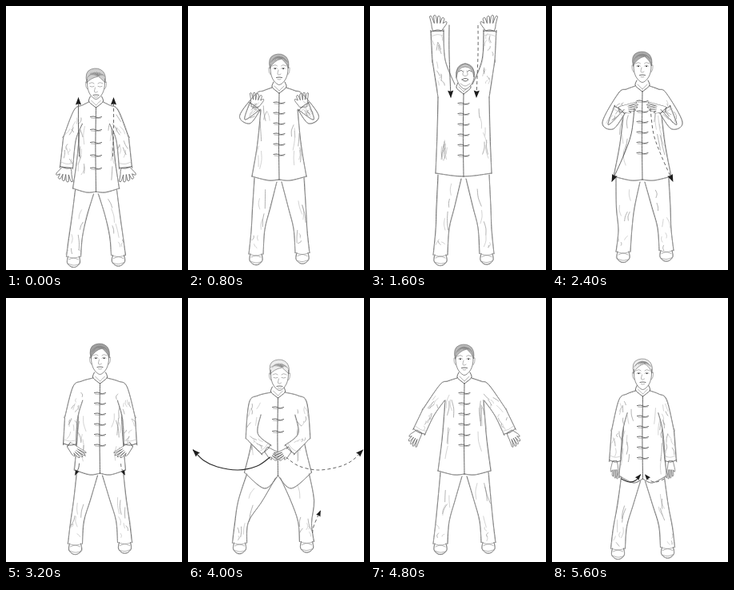
Recreate the animation shown at these times as an HTML page. Size 220 px wide and 330 px high, loop 6.8 s.

```html
<!DOCTYPE html>
<html lang="en">
<head>
<meta charset="utf-8">
<title>Standing exercise</title>
<style>
html, body { margin: 0; width: 100%; height: 100%; overflow: hidden; background: #fff; }
svg { display: block; width: 100vw; height: 100vh; }
path { fill: none; stroke: #555; stroke-width: .9; stroke-linecap: round; stroke-linejoin: round; }
.soft { stroke: #888; stroke-width: .65; }
.faint { stroke: #b4b4b4; stroke-width: .6; }
.dark { stroke: #2a2a2a; stroke-width: 1.15; }
.dash { stroke: #555; stroke-dasharray: 4 3; stroke-linecap: butt; }
.tip { fill: #1c1c1c; stroke: none; }
.skin { fill: #fff; stroke: #666; stroke-width: .75; }
.cover { fill: #fff; stroke: none; }
.hair { fill: #888; stroke: #666; stroke-width: .6; }
</style>
</head>
<body>
<svg id="stage" viewBox="0 0 220 330"></svg>
<script>
const NS = 'http://www.w3.org/2000/svg';
const stage = document.getElementById('stage');
let pen, seed;

function node(name, attrs, parent) {
  const el = document.createElementNS(NS, name);
  for (const k in attrs) el.setAttribute(k, attrs[k]);
  return parent.appendChild(el);
}
const shape = (d, cls = '') => node('path', { d, class: cls }, pen);

function within(transform, draw) {
  const outer = pen;
  pen = node('g', { transform }, outer);
  draw();
  pen = outer;
}

function rand() {
  seed = (seed * 16807) % 2147483647;
  return seed / 2147483647;
}
const jitter = r => (rand() - .5) * 2 * r;
const mix = (a, b, t) => [a[0] + (b[0] - a[0]) * t, a[1] + (b[1] - a[1]) * t];
const shift = (p, n, w) => [p[0] + n[0] * w, p[1] + n[1] * w];

// Smooth curve through a few points
function curve(p) {
  let d = 'M' + p[0];
  for (let i = 0; i < p.length - 1; i++) {
    const a = p[i - 1] || p[i], b = p[i], c = p[i + 1], e = p[i + 2] || c;
    d += 'C' + [shift(b, [c[0] - a[0], c[1] - a[1]], 1 / 6), shift(c, [e[0] - b[0], e[1] - b[1]], -1 / 6), c].join(' ');
  }
  return d;
}
const line = (p, cls) => shape(curve(p), cls);

// A firm stroke with a looser one beside it
function pencil(p) {
  line(p);
  line(p.map(q => [q[0] + jitter(.7), q[1] + jitter(.7)]), 'faint');
}

// Creases scattered along a limb from a to b
function folds(a, b, spread, n) {
  for (let i = 0; i < n; i++) {
    const t = rand() * .75, s = jitter(spread);
    const p = shift(mix(a, b, t), [1, 0], s);
    const q = shift(mix(a, b, t + .1 + rand() * .18), [1, 0], s + jitter(4));
    line([p, shift(mix(p, q, .5), [1, 0], jitter(1.5)), q], i % 2 ? 'soft' : 'faint');
  }
}

function arrow(p, cls) {
  const path = line(p, cls);
  const [a, b] = p.slice(-2);
  const turn = Math.atan2(b[1] - a[1], b[0] - a[0]) * 180 / Math.PI;
  const size = Math.min(1.05, .65 + path.getTotalLength() / 150);
  within(`translate(${b}) rotate(${turn}) scale(${size})`, () => shape('M1 0L-8-3.4L-7 0L-8 3.4Z', 'tip'));
}

// Open hand, fingers along +y
function hand(at, [turn, sx, sy]) {
  within(`translate(${at}) rotate(${turn}) scale(${sx} ${sy})`, () => {
    let d = 'M-4.5-1Q-6 3-6 7';
    for (let i = 0; i < 4; i++) {
      const x = -6 + i * 3, end = 15 + Math.sin(i + .6) * 2, splay = (i - 1.5) * 1.3;
      d += `L${x + splay} ${end}Q${x + splay + 1.5} ${end + 2} ${x + splay + 2.5} ${end - 1}L${x + 3} 8`;
    }
    shape(d + 'L9 10Q11 10 9 6L4.5-1Z', 'skin');
  });
}

function shoe(x, y, w = 16, h = 13) {
  const l = x - w / 2, r = x + w / 2;
  pencil([[l + 1, y], [l, y + h * .6], [x - 3, y + h], [x + 3, y + h], [r, y + h * .6], [r - 1, y]]);
  line([[l + 2, y + 4], [x, y + 2], [r - 2, y + 4]], 'soft');
  line([[l + 1, y + h * .75], [x, y + h * .85], [r - 1, y + h * .7]], 'soft');
}

function head(p) {
  const eye = p.down ? 22 : 18, brow = p.down ? 13 : 9;
  within(`translate(${p.cx + (p.lean || 0)} ${p.top})`, () => {
    for (const s of [-1, 1]) within(`scale(${s} 1)`, () => {
      line([[11, 18], [13, 17], [12.5, 23], [10.5, 26]], 'soft');
    });
    line([[-11, 13], [-10.5, 24], [-7, 33], [0, 38.5], [7, 33], [10.5, 24], [11, 13]], 'skin');
    const cap = shape(`M-11.5 18Q-15 4-6 1Q3-2 9 4Q13 9 11.5 18Q10 ${brow + 3} 3 ${brow - 3}Q-7 ${brow - 1}-11.5 18Z`, 'hair');
    cap.setAttribute('fill-opacity', p.shade || .15);
    for (let i = 0; i < 12; i++) {
      const x = -11 + i * 2, rim = 1 + x * x * .045;
      line([[3 + jitter(2), brow - 4], [x * .6, (rim + brow) / 2 - 2], [x, rim + 3 + rand() * 3]], 'soft');
    }
    for (const s of [-1, 1]) within(`scale(${s} 1)`, () => {
      line([[2.5, eye - 3], [5, eye - 4.3], [8.5, eye - 3]], 'soft');
      line([[2.5, eye + .3], [5, eye + (p.down ? 1 : -1)], [7.5, eye + .3]], 'soft');
      if (!p.down) line([[4.6, eye + .3], [5.6, eye + .3]], 'dark');
    });
    line([[-1, eye + 2], [-2, eye + 7], [0, eye + 8], [2, eye + 7]], 'soft');
    line([[-3.5, eye + 11.5], [0, eye + 11], [3.5, eye + 11.5]]);
    line([[-2, eye + 13.5], [0, eye + 14], [2, eye + 13.5]], 'soft');
  });
}

function faceUp(p) {
  within(`translate(${p.cx + 2} ${p.top})`, () => {
    line([[-11, 18], [-10, 8], [0, 0], [10, 8], [11, 18], [7, 27], [0, 32], [-7, 27], [-11, 18]], 'skin');
    shape('M-11 17Q-13 1 0 0Q13 1 11 17Q9 4 0 4Q-9 4-11 17Z', 'hair').setAttribute('fill-opacity', .5);
    for (const s of [-1, 1]) line([[s * 3, 10], [s * 5, 8.5], [s * 8, 10]]);
    line([[-2, 9], [-3, 14], [0, 15.5], [3, 14], [2, 9]], 'soft');
    line([[-4, 20], [0, 18.5], [4, 20], [0, 22], [-4, 20]]);
    line([[-6, 25], [0, 28], [6, 25]], 'soft');
  });
}

// One half of the body: x runs outwards from the centre line
function leg(p, s) {
  const drift = (p.drift || 0) * s, bow = p.bow || 0;
  const hip = [p.hemW - 3, p.hem - 2], ankle = p.feet + drift, y = p.floor - (s > 0 ? 1.5 : 0);
  const mid = (p.hem + y) / 2;
  pencil([hip, [mix(hip, [ankle + 8], .4)[0] + bow, mid - 10], [ankle + 6, mid + 18], [ankle + 9, y]]);
  pencil([[3, p.hem + 3], [ankle * .33 + 2 + bow / 2, mid - 10], [ankle - 11, mid + 16], [ankle - 9, y]]);
  line([[ankle - 9, y], [ankle, y + 2], [ankle + 9, y]], 'soft');
  folds([p.hemW * .6, p.hem + 8], [ankle, y], 7, 4);
  folds([ankle, y - 25], [ankle, y], 6, 3);
  shoe(ankle, y);
}

function torso(p, up) {
  const top = up ? [32, p.neck + 10] : [p.shoulder, p.neck + 27];
  pencil([top, [mix(top, [p.hemW], .4)[0], (top[1] + p.hem) / 2], [p.hemW, p.hem - 4]]);
  pencil([[0, p.hem], [p.hemW * .4, p.hem + (p.dip || 1)], [p.hemW, p.hem - 4]]);
  folds([p.shoulder - 4, p.neck + 20], [p.hemW - 9, p.hem - 5], 5, 7);
}

function arm(p, s, up) {
  const S = [p.shoulder, p.neck + (up ? -4 : 12)], E = p.elbow, W = p.wrist, w = p.sleeve || 8;
  const normal = (a, b) => {
    const dx = b[0] - a[0], dy = b[1] - a[1], k = (up ? -1 : 1) / Math.hypot(dx, dy);
    return [dy * k, -dx * k];
  };
  const n = normal(S, E), m = normal(E, W);
  const start = up ? [[32, p.neck + 10]] : [[9, p.neck - 1], [p.shoulder - 3, p.neck + 3]];
  const outer = [...start, shift(S, n, w), shift(E, n, w), shift(E, m, w), shift(W, m, w)];
  const inner = [shift(W, m, -w), shift(E, mix(n, m, .5), -w), up ? [11, p.neck - 6] : shift(mix(S, E, .35), n, -w)];
  const cuff = t => [shift(mix(W, E, t), m, w), mix(W, E, t - .05), shift(mix(W, E, t), m, -w)];
  shape('M' + [...outer, ...inner].join('L') + 'Z', 'cover');
  hand(W, p.hand);
  pencil(outer);
  pencil(inner);
  line(cuff(.05));
  line(cuff(.2), 'faint');
  folds(S, E, w - 2, 6);
  folds(E, W, w - 2, 6);
}

function collar(p) {
  line([[7, p.neck - 8], [9, p.neck - 2], [4, p.neck + 3], [0, p.neck + 6]]);
  line([[6, p.neck - 3], [0, p.neck + 3]], 'soft');
}

function frogs({ cx, neck, knots: [n, step] }) {
  for (let i = 0; i < n; i++) {
    const y = neck + 18 + i * step;
    line([[cx - 7, y - .5], [cx - 3, y - 1], [cx, y], [cx + 3, y + .6], [cx + 7, y - .5]]);
    line([[cx - 6, y + 1], [cx, y + 1.4], [cx + 6, y + 1]], 'soft');
  }
}

function figure(p) {
  const up = p.wrist[1] < p.neck;
  const halves = draw => [-1, 1].forEach(s => within(`translate(${p.cx} 0) scale(${s} 1)`, () => draw(s)));
  halves(s => leg(p, s));
  halves(() => torso(p, up));
  line([[p.cx, p.neck + 6], [p.cx - .6, (p.neck + p.hem) / 2], [p.cx, p.hem]]);
  frogs(p);
  halves(s => arm(p, s, up));
  halves(() => collar(p));
  (up ? faceUp : head)(p);
  if (p.arrow) halves(s => arrow(p.arrow, s > 0 ? 'dash' : p.bold ? 'dark' : ''));
  if (p.step) halves(s => s > 0 && arrow(p.step, 'dash'));
}

// Vertical places are on the stage; sideways places run from the centre line
const poses = [
  { cx: 112.5, top: 78, neck: 121, down: true, shade: .4, shoulder: 20, elbow: [33, 166], wrist: [37, 203],
    hand: [-6, 1.2, .95], hem: 232, hemW: 29, feet: 28, floor: 313, knots: [5, 16],
    arrow: [[21, 188], [22, 150], [22, 115]] },
  { cx: 114, top: 60, neck: 103, shade: .6, shoulder: 23, elbow: [43, 142], wrist: [30, 125],
    hand: [175, 1, .95], hem: 217, hemW: 34, feet: 29, floor: 310, knots: [6, 13] },
  { cx: 117, top: 72, neck: 104, shoulder: 26, elbow: [31, 68], wrist: [33, 30],
    hand: [180, 1.2, 1.05], hem: 213, hemW: 35, dip: -1, feet: 29, floor: 311, knots: [6, 13],
    arrow: [[18, 24], [18, 60], [16, 114]] },
  { cx: 113, top: 57, neck: 101, shade: .7, shoulder: 23, elbow: [43, 149], wrist: [28, 129],
    hand: [100, .7, 1.3], hem: 217, hemW: 36, feet: 27, drift: 3, floor: 307, knots: [6, 13],
    arrow: [[10, 128], [14, 160], [24, 188], [38, 219]] },
  { cx: 117.5, top: 57, neck: 101, shade: .8, shoulder: 26, elbow: [36, 150], wrist: [38, 184],
    hand: [52, .75, 1.3], hem: 219, hemW: 32, dip: 2, feet: 31, floor: 307, knots: [6, 13],
    arrow: [[26, 207], [27, 213], [31, 221]] },
  { cx: 112.5, top: 77, neck: 119, lean: 2, down: true, shoulder: 28, elbow: [32, 172], wrist: [14, 190],
    hand: [58, .75, 1.15], hem: 222, hemW: 42, dip: 16, feet: 42, drift: -6, bow: 4, floor: 306, knots: [3, 15],
    bold: true, arrow: [[10, 199], [26, 210], [50, 215], [76, 211], [93, 203], [106, 190]],
    step: [[43, 294], [45, 284], [53, 266]] },
  { cx: 118, top: 58, neck: 101, shade: .6, shoulder: 24, elbow: [45, 143], wrist: [57, 168],
    hand: [-30, .85, 1.05], hem: 220, hemW: 33, feet: 30, floor: 307, knots: [6, 13] },
  { cx: 113.5, top: 76, neck: 117, shoulder: 23, elbow: [32, 166], wrist: [35, 205], sleeve: 7,
    hand: [4, .6, 1.2], hem: 226, hemW: 30, dip: 5, feet: 31, floor: 313, knots: [6, 13],
    bold: true, arrow: [[27, 226], [17, 230], [9, 228], [3, 221]] }
];

const groups = poses.map((pose, i) => {
  seed = 7919 + i * 613;
  pen = node('g', {}, stage);
  figure(pose);
  return pen;
});

const HOLD = 800, LOOP = 6800;
const start = performance.now();
function show(now) {
  const t = Math.max(0, now - start) % LOOP;
  const current = Math.min(poses.length - 1, Math.floor(t / HOLD));
  groups.forEach((g, i) => g.setAttribute('display', i === current ? 'inline' : 'none'));
  requestAnimationFrame(show);
}
show(start);
</script>
</body>
</html>
```
